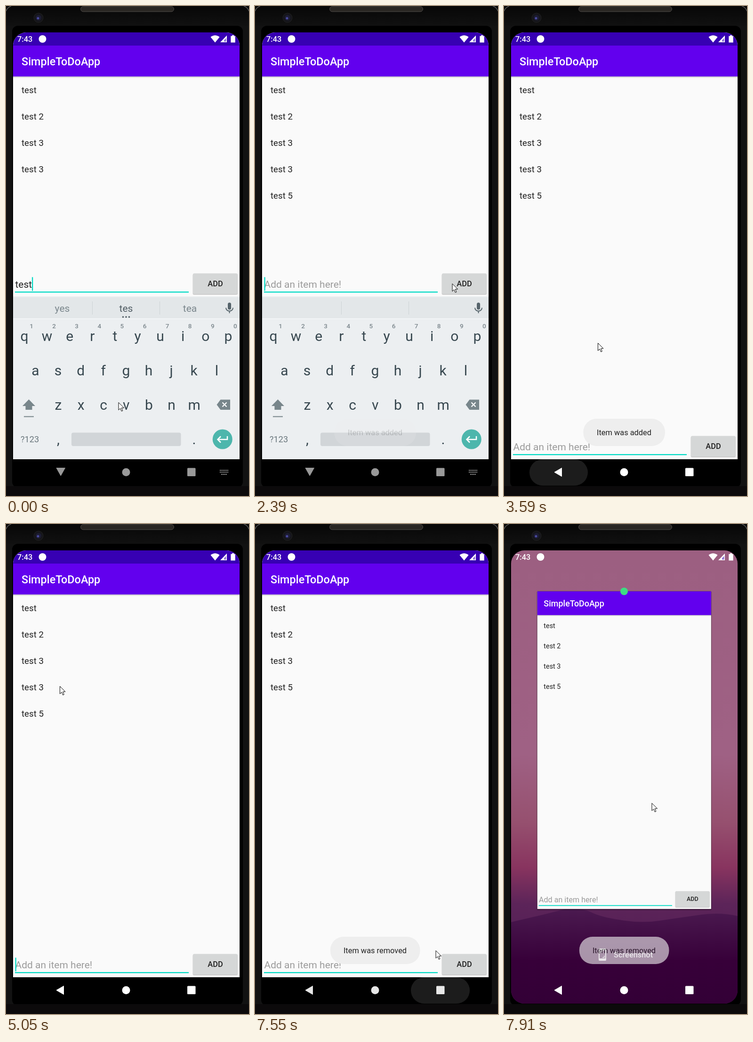
An HTML page that plays this animation: 516x1040 px, repeating every 8000 ms.

```html
<!DOCTYPE html>
<html lang="en">
<head>
<meta charset="utf-8">
<title>To-do app demo</title>
<style>
html, body { margin: 0; width: 100%; height: 100%; overflow: hidden; background: #0c0c0c; }
svg { display: block; width: 100vw; height: 100vh; font-family: Roboto, Arial, sans-serif; }
text { white-space: pre; }
.mid { text-anchor: middle; }
.med { font-weight: 500; }
.item { font-size: 18.7px; fill: #212121; }
.field { font-size: 21px; }
.sugg { font-size: 21px; fill: #7b878d; text-anchor: middle; }
.key { font-size: 30px; fill: #37474f; text-anchor: middle; }
.hint { font-size: 13.5px; font-weight: 500; fill: #7b868c; text-anchor: middle; }
</style>
</head>
<body>
<svg viewBox="0 0 516 1040" preserveAspectRatio="none">
  <defs>
    <linearGradient id="sky" x1="0" y1="0" x2="0" y2="1">
      <stop offset="0" stop-color="#9c5f81"/>
      <stop offset=".45" stop-color="#9f6184"/>
      <stop offset=".6" stop-color="#96506f"/>
      <stop offset=".7" stop-color="#88345f"/>
      <stop offset=".78" stop-color="#5c2459"/>
      <stop offset="1" stop-color="#4a1850"/>
    </linearGradient>
    <linearGradient id="hill" x1="0" y1="0" x2="0" y2="1">
      <stop offset="0" stop-color="#4b1a50"/>
      <stop offset=".55" stop-color="#370039"/>
      <stop offset="1" stop-color="#330036"/>
    </linearGradient>
    <linearGradient id="shade" x1="0" y1="0" x2="0" y2="1">
      <stop offset="0" stop-opacity=".25"/>
      <stop offset="1" stop-opacity="0"/>
    </linearGradient>
    <linearGradient id="top" x1="0" y1="0" x2="0" y2="1">
      <stop offset="0" stop-color="#070707"/>
      <stop offset="1" stop-color="#111"/>
    </linearGradient>
    <pattern id="mesh" width="3" height="3" patternUnits="userSpaceOnUse">
      <rect width="3" height="3" fill="#1b1917"/>
      <circle cx="1.5" cy="1.5" r="1" fill="#45403b"/>
    </pattern>
    <clipPath id="screen"><rect x="15" y="56" width="481" height="962" rx="28"/></clipPath>
    <clipPath id="crop"><rect id="cropBox" x="15" y="56" width="481" height="906"/></clipPath>
    <clipPath id="above"><rect x="15" y="56" width="481" height="906"/></clipPath>
  </defs>

  <!-- phone body -->
  <rect width="516" height="1040" fill="#121212"/>
  <rect width="516" height="43" fill="url(#top)"/>
  <rect x="13" y="42" width="490" height="980" rx="12" fill="#000"/>
  <rect y="1019" width="516" height="21" fill="#0c0a0b"/>
  <path d="M0 11Q3 3 11 0M505 0Q513 3 516 11" fill="none" stroke="#555" stroke-width="1.5"/>
  <rect x="158.500" y="1" width="198" height="11" rx="5.500" fill="url(#mesh)" stroke="#4d4a47"/>
  <circle cx="69" cy="25" r="10" fill="#15151a" stroke="#222"/>
  <circle cx="69" cy="25" r="6" fill="#1c1c33"/>
  <circle cx="68" cy="26" r="2.500" fill="#4a4aa0"/>

  <g clip-path="url(#screen)">
    <g id="wall">
      <rect x="15" y="56" width="481" height="962" fill="url(#sky)"/>
      <path d="M15 845Q45 838 75 831T130 817Q165 814 185 824T245 840Q290 848 330 842T420 829Q460 824 496 832V1018H15z" fill="url(#hill)"/>
    </g>
    <g id="shot" fill="#fff">
      <path d="M203 901h12a2 2 0 0 1 2 2v22a2 2 0 0 1-2 2h-12a2 2 0 0 1-2-2v-22a2 2 0 0 1 2-2zM203 905v17h12v-17z" fill-rule="evenodd"/>
      <path d="M205 911v-4h4M213 916v4h-4" fill="none" stroke="#fff" stroke-width="1.500"/>
      <text class="med" x="233" y="920" font-size="16.400">Screenshot</text>
    </g>

    <g id="app">
      <rect id="cardShade" x="13.500" y="83" width="484" height="882" rx="4" fill="#000" opacity=".3"/>
      <g clip-path="url(#crop)">
        <rect x="15" y="56" width="481" height="906" fill="#fafafa"/>
        <rect x="15" y="149" width="481" height="4" fill="url(#shade)"/>
        <rect x="15" y="56" width="481" height="28" fill="#3700b3"/>
        <rect x="15" y="84" width="481" height="65.500" fill="#6200ee"/>
        <text class="med" x="33" y="126" font-size="23.400" fill="#fff">SimpleToDoApp</text>
        <g id="list"></g>
        <g id="entry">
          <text id="typed" class="field" x="19.500" y="598"></text>
          <rect id="compose" x="19" y="600" width="36" height="1.200" fill="#333"/>
          <rect x="19" y="606" width="369" height="2.300" fill="#03dac5"/>
          <rect id="caret" y="575.500" width="2.300" height="29" fill="#03dac5"/>
          <rect x="396.500" y="568.500" width="95.500" height="44.500" rx="3" fill="#000" opacity=".18"/>
          <rect id="button" x="397" y="567.500" width="94.500" height="43.500" rx="2.500"/>
          <text class="mid med" x="444.500" y="595" font-size="16.400" fill="#212121">ADD</text>
        </g>
      </g>
    </g>

    <g clip-path="url(#above)">
      <g id="board">
        <rect x="15" y="616" width="481" height="346" fill="#eceff1"/>
        <rect x="15" y="618" width="481" height="45" fill="#e3e7e9"/>
        <rect x="15" y="663" width="481" height="1.500" fill="#f6f8f9"/>
        <path d="M183.500 627v28M326.500 627v28" stroke="#cdd3d6"/>
        <g id="words">
          <text class="sugg" x="119.500" y="649"></text>
          <text class="sugg" x="255" y="649" style="fill:#4f5b62"></text>
          <text class="sugg" x="390.500" y="649"></text>
          <g id="dots" fill="#4f5b62"><circle cx="248.500" cy="660" r="1.800"/><circle cx="255" cy="660" r="1.800"/><circle cx="261.500" cy="660" r="1.800"/></g>
        </g>
        <g fill="none" stroke="#56646b">
          <path d="M474.500 633v8" stroke-width="7" stroke-linecap="round"/>
          <path d="M467 640.500a7.500 7 0 0 0 15 0M474.500 647.500v4.500" stroke-width="2"/>
        </g>
        <path d="M48.500 835L62 849H55.500V857H41.500V849H35z" fill="#78868b"/>
        <path d="M38 871.500h21" stroke="#78868b" stroke-width="2"/>
        <path d="M455.500 835.500H476V857H455.500L447.500 846.200z" fill="#78868b"/>
        <path d="M459.500 841.500l9 9m0-9l-9 9" stroke="#fff" stroke-width="2.200"/>
        <text x="31" y="926" font-size="18.200" fill="#6b787e">?123</text>
        <rect x="139" y="905.500" width="232.500" height="28.500" rx="4" fill="#d1d5d8"/>
        <circle cx="459.700" cy="919.500" r="21" fill="#4db6ac"/>
        <path d="M470 913v7h-20M456 913.500l-6.500 6.500 6.500 6.500" fill="none" stroke="#fff" stroke-width="2.500"/>
      </g>
    </g>

    <rect id="navBg" x="15" y="962" width="481" height="56" fill="#000"/>
    <rect id="rippleBack" x="54" y="962" width="124" height="56" rx="28" fill="#fff"/>
    <rect id="rippleRecent" x="331" y="962" width="125" height="56" rx="28" fill="#fff"/>
    <g id="nav" fill="#fff">
      <path id="backDown" d="M107 980.500h18.500l-9.200 16.500z" stroke="#fff" stroke-linejoin="round"/>
      <path id="backLeft" d="M122.500 980.500v18l-15.500-9z" stroke="#fff" stroke-linejoin="round"/>
      <circle cx="255" cy="989.500" r="8.500"/>
      <rect x="385" y="980.500" width="17.500" height="17.500" rx="1.500"/>
      <path id="dial" d="M454 985.500h18M454 989.500h18M457 994h12" stroke="#fff" stroke-width="2.200" stroke-dasharray="2.200 1"/>
    </g>

    <g fill="#fff">
      <text class="med" x="24" y="76" font-size="16.400">7:43</text>
      <circle cx="77.500" cy="70" r="8"/>
      <path d="M434.500 66Q444 58.500 453.500 66L444 77.500z"/>
      <path d="M469 62.500V77H455z"/>
      <path d="M467.500 68v7.500h-4.500v-3z" fill="#3700b3" opacity=".55"/>
      <path d="M480 62h4v1.800h2.700V77.500H477.300V63.800H480z"/>
    </g>
    <circle id="badge" cx="255" cy="143" r="8" fill="#3ddc84"/>

    <g id="toast">
      <rect id="pill" y="876" height="58" rx="28" fill="#eee"/>
      <text id="note" class="mid" x="255" y="911" font-size="16.400" fill="#212121"></text>
    </g>
  </g>

  <path id="mouse" d="M.5.5V16.500L4.200 13 6.800 19 9.300 18 6.800 12H12z" fill="#fff" stroke="#000" stroke-width="1"/>
</svg>

<script>
const LOOP = 8000;
const $ = id => document.getElementById(id);
const ramp = (t, a, b) => Math.min(1, Math.max(0, (t - a) / (b - a)));
const show = (id, on) => $(id).setAttribute('opacity', +on);
const put = (el, s) => { if (el.textContent !== s) el.textContent = s; };

function addText(parent, cls, x, y, str) {
  const el = document.createElementNS('http://www.w3.org/2000/svg', 'text');
  el.setAttribute('class', cls);
  el.setAttribute('x', x);
  el.setAttribute('y', y);
  el.textContent = str;
  parent.appendChild(el);
  return el;
}

const PITCH = 48.1;
[['qwertyuiop', 39, 711], ['asdfghjkl', 62.5, 784], ['zxcvbnm', 111, 857]].forEach(([row, x, y]) =>
  [...row].forEach((c, i) => addText($('board'), 'key', x + i * PITCH, y, c)));
[...'1234567890'].forEach((c, i) => addText($('board'), 'hint', 54 + i * PITCH, 684, c));
addText($('board'), 'key', 111, 930, ',');
addText($('board'), 'key', 399.5, 930, '.');

const rows = Array.from({ length: 5 }, (_, i) => addText($('list'), 'item', 33, 185 + i * 56.1, ''));
const words = $('words').querySelectorAll('text');

const ticks = [[0, 1], [120, 1], [270, 3], [660, 1], [810, 1], [960, 3], [1350, 1], [1630, 1], [2030, 5],
  [2660, 2], [2930, 2], [3200, 3], [3590, 1], [3740, 6], [4490, 1], [5050, 1], [5450, 1], [5690, 7],
  [6560, 2], [6830, 1], [6980, 2], [7250, 1], [7400, 1], [7550, 4]]
  .flatMap(([start, n]) => Array.from({ length: n }, (_, i) => start + i * 120));

// pointer path: [time, x, y]
const path = [[270, 238.5, 841], [510, 223, 777], [660, 223, 777], [810, 219, 776], [1200, 414, 589],
  [1350, 418.5, 589], [2510, 418.5, 589], [2660, 405, 640], [2780, 355, 780], [3050, 113, 1002],
  [3200, 113, 990], [3440, 113, 990], [3590, 199, 715], [3980, 114, 338], [4100, 114, 344],
  [6410, 114, 344], [6680, 248, 581], [6830, 350, 1002], [6980, 382, 1020], [7100, 394.5, 1002],
  [7400, 395, 1002], [7550, 383.5, 905], [7910, 313.5, 592]];

function pointer(t) {
  const i = path.findIndex(k => k[0] > t);
  if (i < 0) return path[path.length - 1].slice(1);
  if (i === 0) return path[0].slice(1);
  const a = path[i - 1], b = path[i], u = ramp(t, a[0], b[0]);
  return [a[1] + (b[1] - a[1]) * u, a[2] + (b[2] - a[2]) * u];
}

function caretOn(t) {
  if (t < 2030) return t < 1200 || t >= 1630;
  return t < 7400 && Math.floor((t + 100) / 500) % 2 === 0;
}

function drawEntry(t) {
  const text = t < 390 ? 'test' : t < 660 ? 'test ' : t < 2270 ? 'test 5' : '';
  put($('typed'), text || 'Add an item here!');
  $('typed').setAttribute('fill', text ? '#212121' : '#9b9b9b');
  const x = { 4: 55, 5: 60.5, 6: 72, 0: 19.5 }[text.length];
  $('caret').setAttribute('x', x);
  show('caret', caretOn(t));
  show('compose', t >= 120 && t < 390);
  $('button').setAttribute('fill', t >= 2030 && t < 2390 ? '#c6c8c8' : '#d5d7d7');
  $('entry').setAttribute('transform', `translate(0 ${t < 3440 ? 0 : 345})`);

  const items = ['test', 'test 2', 'test 3', 'test 3'];
  if (t >= 2270) items.push('test 5');
  if (t >= 5930) items.splice(3, 1);
  rows.forEach((el, i) => put(el, items[i] || ''));
}

function drawBoard(t) {
  const set = t < 120 ? ['yes', 'tes', 'tea'] : t < 660 ? ['Test', 'test', 'tests'] : ['', '', ''];
  words.forEach((el, i) => put(el, set[i]));
  show('dots', t < 660);
  $('board').setAttribute('transform', `translate(0 ${346 * ramp(t, 3407, 3557)})`);
  show('board', t < 3590);
}

function drawNav(t, p) {
  const dim = t < 3440 ? 0.6 : t < 7400 ? 1 - 0.4 * ramp(t, 5600, 6680) : 0.75 + 0.25 * ramp(t, 7400, 7650);
  show('nav', dim);
  show('backDown', t < 3440);
  show('backLeft', t >= 3440);
  show('dial', t < 3440);
  show('navBg', 1 - p);
  show('rippleBack', 0.11 * ramp(t, 3350, 3500) * (1 - ramp(t, 3620, 4100)));
  show('rippleRecent', 0.11 * ramp(t, 7250, 7450) * (1 - ramp(t, 7580, 7790)));
}

function drawToast(t) {
  const added = t < 5000;
  const alpha = added ? ramp(t, 2300, 2800) * (1 - ramp(t, 4200, 4490))
                      : ramp(t, 5900, 6400) * (1 - ramp(t, 7790, 8105));
  const width = added ? 173.5 : 190.5;
  put($('note'), added ? 'Item was added' : 'Item was removed');
  $('pill').setAttribute('width', width);
  $('pill').setAttribute('x', 255.2 - width / 2);
  show('toast', alpha);
}

function draw(now) {
  const clock = now % LOOP;
  const t = ticks.filter(k => k <= clock).pop();
  const p = 1 - (1 - ramp(t, 7580, 7910)) ** 3;

  drawEntry(t);
  drawBoard(t);
  drawNav(t, p);
  drawToast(t);

  $('app').setAttribute('transform', `translate(${59 * p} ${78.5 * p}) scale(${1 - 0.232 * p})`);
  $('cropBox').setAttribute('y', 56 + 28 * p);
  $('cropBox').setAttribute('height', 906 - 28 * p);
  show('cardShade', 0.3 * p);
  show('wall', p > 0);
  show('shot', 0.85 * ramp(p, 0.5, 1));
  show('badge', ramp(p, 0.8, 1));

  const [x, y] = pointer(t);
  $('mouse').setAttribute('transform', `translate(${x} ${y})`);
}

const start = performance.now();
function tick() {
  draw(performance.now() - start);
  requestAnimationFrame(tick);
}
tick();
</script>
</body>
</html>
```
